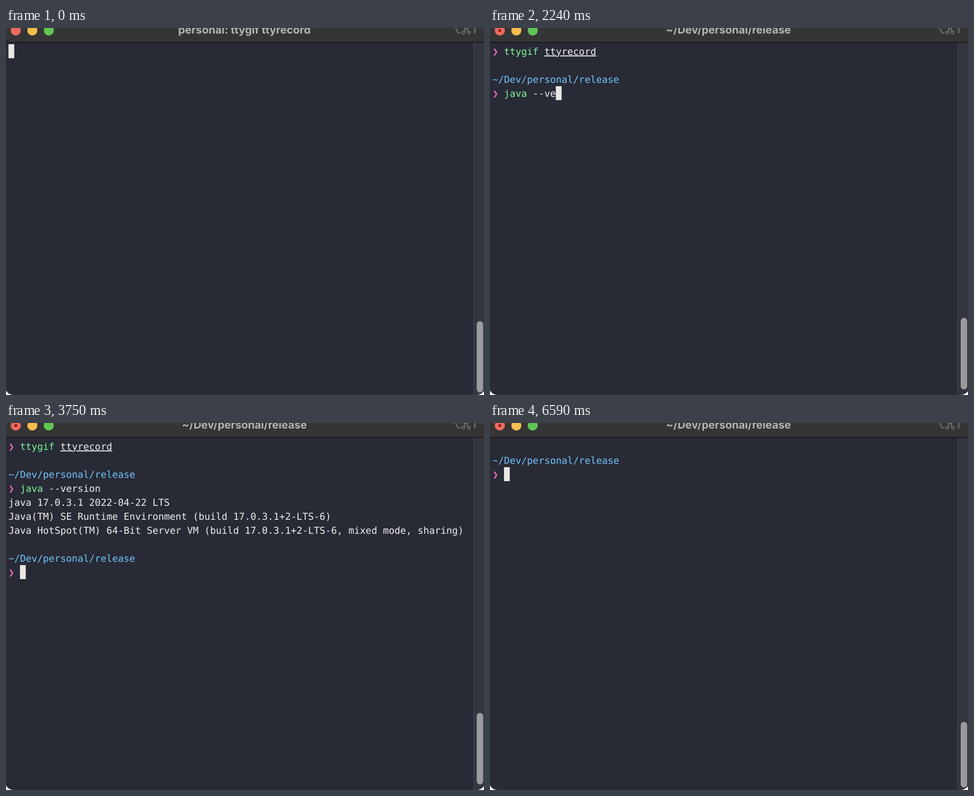
An HTML page that plays this animation: 853 by 656 pixels, repeating every 8000 ms.

```html
<!DOCTYPE html>
<html lang="en">
<head>
<meta charset="utf-8">
<title>Terminal</title>
<style>
  html, body { margin: 0; width: 100%; height: 100%; overflow: hidden; background: #fff; }
  svg { display: block; width: 100%; height: 100%; }
  text { text-rendering: geometricPrecision; }
  #screen text { font: 17.08px "DejaVu Sans Mono", monospace; }
  #title { font: 700 19.3px Inter, sans-serif; fill: #b4b4b4; text-anchor: middle; }
  .keys { fill: none; stroke: #717171; stroke-width: 2; }
  .under { text-decoration: underline 1.5px; text-underline-offset: 3px; text-decoration-skip-ink: none; }
</style>
</head>
<body>
<svg viewBox="0 0 853 656" preserveAspectRatio="none">
  <path d="M0 0H853V649Q848 655 840 656H13Q4 655 0 648Z" fill="#282a36"/>
  <path d="M835 26H853V649Q848 655 840 656H835Z" fill="#33353f"/>
  <path d="M834.5 26V656" stroke="#444650"/>
  <rect id="thumb" x="840" width="11.5" rx="5.75" fill="#9b9b9d"/>
  <rect width="853" height="25" fill="#353535"/>
  <rect y="25" width="853" height="1.2" fill="#0e0e10"/>
  <circle cx="17.5" cy="4.5" r="9" fill="#ed6a5f"/>
  <circle id="dot" cx="17.5" cy="4.5" r="2.6" fill="#8c1a10"/>
  <circle cx="47" cy="4.5" r="9" fill="#f5bf4f"/>
  <circle cx="76.3" cy="4.5" r="9" fill="#61c554"/>
  <text id="title" x="425.5" y="10"></text>
  <g class="keys">
    <path d="M799 -3H801L806.5 8.5H811M806 -3H811"/>
    <path d="M818.5 6.5V-1.5M823.5 6.5V-1.5M818.5 5.8H816.2A2.4 2.4 0 1 0 818.5 8V-2M823.5 5.8H825.8A2.4 2.4 0 1 1 823.5 8V-2M817 .8H825" stroke-width="1.7"/>
    <path d="M836.5 -4V9.5" stroke-width="2.4"/>
  </g>
  <g id="screen"></g>
</svg>
<script>
const LOOP = 8000, CELL = 10.28, ROW = 25, LEFT = 4.4, TOP = 29;
const WHITE = "#eff0eb", GREEN = "#7ff696", RED = "#ec6a5c", BLUE = "#72c5fb", PINK = "#f06fbf";
const PATH = "~/Dev/personal/release";
const JAVA = "java --version";
const OUTPUT = [
  "java 17.0.3.1 2022-04-22 LTS",
  "Java(TM) SE Runtime Environment (build 17.0.3.1+2-LTS-6)",
  "Java HotSpot(TM) 64-Bit Server VM (build 17.0.3.1+2-LTS-6, mixed mode, sharing)"
];
const JAVA_KEYS = [850, 970, 1140, 1240, 1340, 1530, 1660, 2020, 2240, 2410, 2570, 2790, 2900, 3080];
const CLEAR_KEYS = [4530, 4637, 4745, 4852, 4960];

const el = id => document.getElementById(id);
const count = (keys, t) => keys.filter(k => t >= k).length;

const run = (row, col, text, color = WHITE, cls = "") =>
  `<text x="${LEFT + col * CELL}" y="${TOP + 19 + row * ROW}" fill="${color}" class="${cls}">${text}</text>`;

const cursor = (row, col = 0) =>
  `<rect x="${LEFT + col * CELL}" y="${TOP + row * ROW}" width="${CELL}" height="${ROW}" fill="#e9e8e4"/>`;

// Path line with the prompt below it
const prompt = row => run(row, 0, PATH, BLUE) + run(row + 1, 0, "❯", PINK);

// First word turns green once it is a known command
function command(row, text, name) {
  const word = text.slice(0, name.length), rest = text.slice(name.length).trim();
  return run(row, 2, word, word === name ? GREEN : RED) +
    (rest ? run(row, 3 + name.length, rest) : "");
}

function typing(row, text, name, keys, t) {
  const n = count(keys, t);
  return command(row, text.slice(0, n), name) + cursor(row, 2 + n);
}

const history = () => run(0, 0, "❯", PINK) + run(0, 2, "ttygif", GREEN) +
  run(0, 9, "ttyrecord", WHITE, "under") + prompt(2);
const ran = () => history() + command(3, JAVA, "java");
const printed = () => ran() + OUTPUT.map((s, i) => run(4 + i, 0, s)).join("");
const second = () => printed() + prompt(8);

const START = [524, 127.5], FULL = [518, 128], CLEARED = [534, 117.5];

// Start time, title, thumb top and height, screen contents
const scenes = [
  [0, "personal: ttygif ttyrecord", START, () => cursor(0)],
  [100, PATH, START, () => cursor(1)],
  [850, PATH, FULL, t => history() + typing(3, JAVA, "java", JAVA_KEYS, t)],
  [3510, "release: java --version", FULL, () => ran() + cursor(4)],
  [3590, "release: java --version", FULL, () => printed() + cursor(7)],
  [3670, PATH, FULL, () => printed() + cursor(8)],
  [3750, PATH, FULL, t => second() + typing(9, "clear", "clear", CLEAR_KEYS, t)],
  [6290, "release: clear", FULL, () => second() + command(9, "clear", "clear") + cursor(10)],
  [6390, "release: clear", CLEARED, () => cursor(0)],
  [6490, PATH, CLEARED, () => cursor(1)],
  [6590, PATH, CLEARED, () => prompt(1) + cursor(2, 2)]
];

let shown = "";
function draw(now) {
  const t = now % LOOP;
  const [, title, [top, height], content] = scenes.findLast(s => t >= s[0]);
  const markup = content(t);
  if (title + markup !== shown) {
    shown = title + markup;
    el("title").textContent = title;
    el("thumb").setAttribute("y", top);
    el("thumb").setAttribute("height", height);
    el("dot").setAttribute("opacity", t < 100 ? 0 : 1);
    el("screen").innerHTML = markup;
  }
}

const begin = performance.now();
function tick() {
  draw(performance.now() - begin);
  requestAnimationFrame(tick);
}
tick();
</script>
</body>
</html>
```
